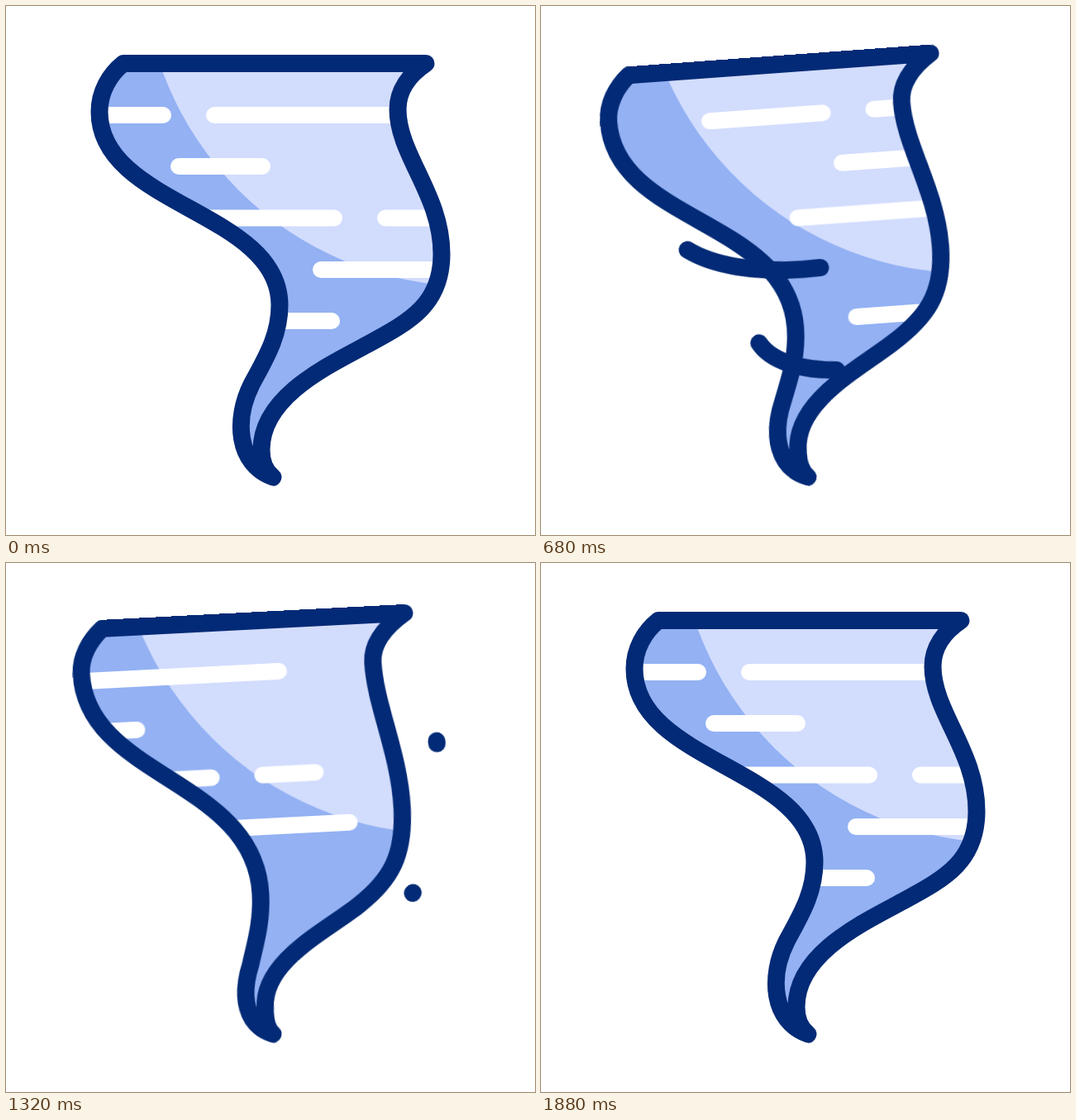
An HTML page without scripts for the animation above (2 s loop, 640x640 px).

```html
<!DOCTYPE html>
<html lang="en">
<head>
<meta charset="utf-8">
<title>Tornado</title>
<style>
html, body { margin: 0; width: 100%; height: 100%; overflow: hidden; background: #fff; }
svg { display: block; width: 100%; height: 100%; }

@property --head { syntax: "<length>"; inherits: false; initial-value: 0px; }
@property --tail { syntax: "<length>"; inherits: false; initial-value: 0px; }

.ink { fill: none; stroke: #032a76; stroke-width: 21; stroke-linecap: round; stroke-linejoin: round; }
.bars { fill: none; stroke: #fff; stroke-width: 20; stroke-linecap: round; }

/* Whole funnel leans around its foot */
.sway { transform-origin: 320px 570px; animation: sway 2s infinite; }
@keyframes sway {
  0% { transform: rotate(0deg); animation-timing-function: cubic-bezier(.37, 0, .56, 1); }
  23.5% { transform: rotate(-11.2deg); animation-timing-function: cubic-bezier(.37, 0, .63, 1); }
  48% { transform: rotate(6.8deg); animation-timing-function: cubic-bezier(.33, 0, .6, .5); }
  58% { transform: rotate(.9deg); animation-timing-function: cubic-bezier(.3, .55, .6, 1); }
  68% { transform: rotate(-3.1deg); animation-timing-function: cubic-bezier(.5, 0, .8, .22); }
  76% { transform: rotate(-2.65deg); animation-timing-function: cubic-bezier(.3, .45, .6, 1); }
  94%, 100% { transform: rotate(0deg); }
}

/* Bend between a wide and a narrow outline */
.body { animation: bend 2s cubic-bezier(.37, 0, .63, 1) infinite; }
@keyframes bend {
  0% { animation-timing-function: cubic-bezier(.37, 0, .45, 1); }
  0%, 48%, 94%, 100% {
    d: path("M323 570C279 554 276 500 297 458C313 428 331 400 331 362C331 248 113 242 113 128C113 104 125 83 142 69.5L508 69.5C488 83 474 102 474 125C474 180 527 228 527 300C527 360 490 381 440 408C390 435 309 472 309 537C309 551 314 563 323 570Z");
  }
  24%, 71% {
    d: path("M323 570C292 558 287 526 301 487C305 468 315 440 315 405C315 262 114 250 114 122C114 102 126 83 142 69.5L508 69.5C484 85 466 104 466 127C466 178 489 240 489 305C489 362 474 392 434 421C395 450 316 482 316 538C315 551 316 563 323 570Z");
  }
}

/* Wind streaks travel one full period per loop */
.wind { animation: wind 2s infinite; }
@keyframes wind {
  0% { transform: translateX(0); animation-timing-function: cubic-bezier(.33, 0, .67, .35); }
  20% { transform: translateX(59px); animation-timing-function: cubic-bezier(.33, .23, .67, .62); }
  34% { transform: translateX(182px); animation-timing-function: linear; }
  42% { transform: translateX(267px); animation-timing-function: cubic-bezier(.33, .37, .67, .68); }
  58% { transform: translateX(411px); animation-timing-function: cubic-bezier(.33, .37, .67, .77); }
  76% { transform: translateX(549px); animation-timing-function: cubic-bezier(.33, .51, .67, 1); }
  94%, 100% { transform: translateX(612px); }
}

/* Gusts: the head runs ahead, the tail catches up */
.gust {
  stroke-dasharray: calc(var(--head) - var(--tail)) 300px;
  stroke-dashoffset: calc(-1 * var(--tail));
  animation: 2s cubic-bezier(.33, 0, .67, 1) infinite;
}
.upper { animation-name: head1, tail1, show1; }
.lower { animation-name: head2, tail2, show2; }
@keyframes head1 {
  0%, 16% { --head: 0px; animation-timing-function: cubic-bezier(.4, .1, .7, .5); }
  34% { --head: 46px; animation-timing-function: cubic-bezier(.33, .46, .67, 1); }
  52%, 100% { --head: 100px; }
}
@keyframes tail1 { 0%, 27.5% { --tail: 0px; } 68%, 100% { --tail: 99.9px; } }
@keyframes show1 {
  0%, 68%, 100% { opacity: 0; animation-timing-function: step-end; }
  17% { opacity: 1; animation-timing-function: step-end; }
}
@keyframes head2 { 0%, 19% { --head: .1px; } 52%, 100% { --head: 100px; } }
@keyframes tail2 { 0%, 30.5% { --tail: 0px; } 67%, 100% { --tail: 99.9px; } }
@keyframes show2 {
  0%, 67%, 100% { opacity: 0; animation-timing-function: step-end; }
  19.5% { opacity: 1; animation-timing-function: step-end; }
}
</style>
</head>
<body>
<svg viewBox="0 0 640 640">
  <defs>
    <clipPath id="inside"><path class="body"/></clipPath>
    <path id="streaks" d="M53 132H190M252 132H485M209 194H310M151 256.500H397M459 256.500H523M381 319H561M213 381H394"/>
  </defs>
  <g class="sway">
    <!-- roomy backdrop keeps the rotated edges smooth -->
    <rect x="-200" y="-200" width="1040" height="1040" fill="#fff"/>
    <g clip-path="url(#inside)">
      <rect x="60" y="40" width="520" height="560" fill="#93b1f3"/>
      <circle cx="562" cy="-58" r="397" fill="#d2dcfd"/>
      <g class="bars wind">
        <use href="#streaks"/>
        <use href="#streaks" x="-612"/>
      </g>
    </g>
    <path class="ink body"/>
    <path class="ink gust upper" pathLength="100" d="M177 264C198 299 262 319 335 319C400 319 466 307 506 286C531 272 541 248 539 226"/>
    <path class="ink gust lower" pathLength="100" d="M273 398C283 426 325 443 378 444C425 444 480 434 501 408"/>
  </g>
</svg>
</body>
</html>
```
